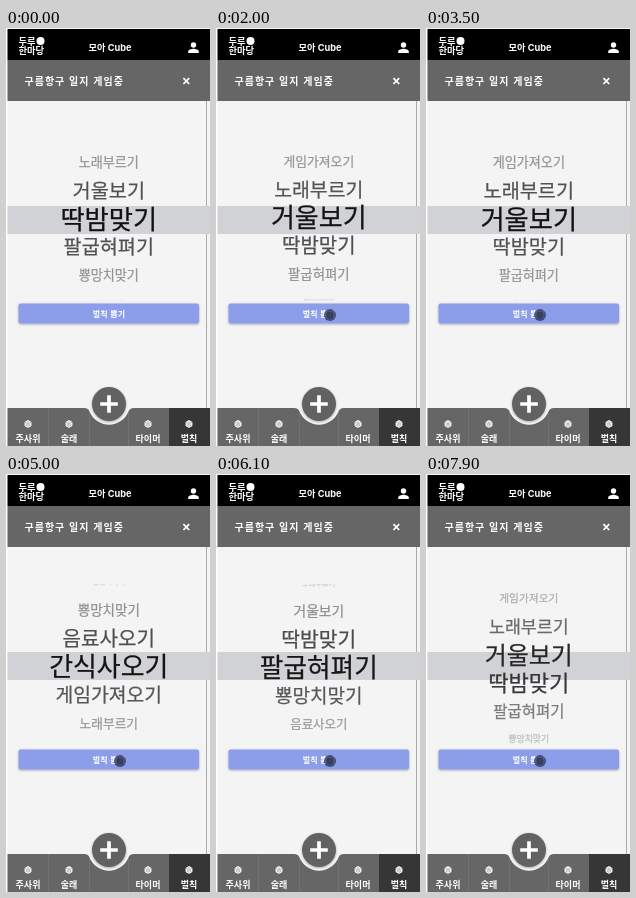
Write an HTML page that moves like this. It is 204 px wide and 418 px high and loops after 8 s.

```html
<!DOCTYPE html>
<html lang="ko">
<head>
<meta charset="utf-8">
<title>벌칙 뽑기</title>
<style>
  html, body { margin: 0; width: 100%; height: 100%; overflow: hidden; background: #fff; }
  svg { display: block; width: 100%; height: 100%; }
  text { font-family: "Noto Sans CJK KR", "Noto Sans CJK", "Noto Sans CJK JP", sans-serif; fill: #fff; }
  .bold { font-weight: 700; }
  .mid { text-anchor: middle; }
  #title { font-family: Inter, "Noto Sans CJK KR", sans-serif; }
  #wheel text { fill: #111; stroke: #111; stroke-width: .25; text-anchor: middle; }
</style>
</head>
<body>
<svg viewBox="0 0 204 418">
  <defs>
    <clipPath id="window"><rect y="110" width="204" height="162.5"/></clipPath>
    <filter id="shadow" x="-20%" y="-20%" width="140%" height="160%">
      <feDropShadow dx="0" dy=".8" stdDeviation=".9" flood-opacity=".35"/>
    </filter>
    <g id="die">
      <path d="M0-3.9 3.4-2V2L0 3.900-3.400 2V-2Z" fill="#fff"/>
      <path d="M-3.200-1.800 0 0 3.200-1.800M0 0V3.700" fill="none" stroke="#666" stroke-width=".5"/>
      <g fill="#555">
        <circle cy="-2" r=".6"/><circle cx="-1.700" cy="1" r=".6"/><circle cx="1.700" cy="1" r=".6"/>
      </g>
    </g>
  </defs>

  <rect x="1.5" width="202.5" height="418" fill="#f4f4f4"/>
  <path d="M200.5 73V382" stroke="#aaa"/>

  <!-- header -->
  <rect x="1.5" y="1" width="202.5" height="31" fill="#000"/>
  <g class="bold">
    <text x="12.5" y="16.6" font-size="9.3">두루</text>
    <text x="12.5" y="25.6" font-size="9.3">한마당</text>
    <text id="title" class="mid" x="104" y="23.3" font-size="9.2">모아 Cube</text>
  </g>
  <circle cx="34.5" cy="13" r="4" fill="#fff"/>
  <g fill="#fff">
    <circle cx="187.5" cy="17" r="2.7"/>
    <path d="M182.2 25v-1.4c0-1.9 3.5-2.800 5.300-2.800s5.300.9 5.300 2.800V25Z"/>
  </g>
  <rect x="1.5" y="32" width="202.5" height="41" fill="#666"/>
  <text class="bold" x="18.5" y="56.5" font-size="10" letter-spacing="1">구름항구 일지 게임중</text>
  <path d="m177.4 50.2 5.800 5.800m0-5.800-5.800 5.800" stroke="#fff" stroke-width="1.7"/>

  <!-- picker -->
  <rect x="1.5" y="178" width="202.5" height="28" fill="#d1d2d6"/>
  <g id="wheel" clip-path="url(#window)"></g>

  <!-- button -->
  <rect x="12.5" y="275.5" width="180.5" height="20" rx="2" fill="#8c9eea" filter="url(#shadow)"/>
  <text class="bold mid" x="103" y="288.5" font-size="8" letter-spacing=".2">벌칙 뽑기</text>
  <g id="pointer">
    <circle r="6" fill="#30385c" opacity=".8"/>
    <circle r="3.500" fill="#262c48" opacity=".5"/>
  </g>

  <!-- bottom bar -->
  <path d="M1.5 380H78Q82.5 380 83.5 383.5A21 21 0 0 0 122.5 383.5Q123.5 380 128 380H204V418H1.5Z" fill="#666"/>
  <path d="M163 380H204V418H163Z" fill="#363636"/>
  <path d="M42.5 380V418M83.5 384V418M122.5 384V418" stroke="#777" stroke-width=".7"/>
  <circle cx="103" cy="376" r="17" fill="#626262" filter="url(#shadow)"/>
  <path d="M103 367.200V384.800M94.200 376H111.800" stroke="#fff" stroke-width="3.7"/>
  <g id="tabs"></g>
</svg>
<script>
const LOOP = 8000, STEP = 100;
const PENALTIES = ["노래부르기", "거울보기", "딱밤맞기", "팔굽혀펴기",
                   "뿅망치맞기", "음료사오기", "간식사오기", "게임가져오기"];
const TABS = [["주사위", 22], ["술래", 63], ["타이머", 142], ["벌칙", 183]];

// [ms, wheel position]: spins accelerate briefly, then coast to a stop
const SPINS = [
  [0, 18], [1150, 18], [1400, 17], [1600, 14.5], [2000, 9.04], [2300, 5.85],
  [2700, 2.99], [3000, 1.8], [3500, 1],
  [4550, 1], [4800, 0.1], [5000, -2.06], [5400, -7.4], [5700, -10.5],
  [6100, -13.1], [6400, -13.65], [6900, -14],
  [7650, -14], [7900, -14.64], [8000, -15.4]
];

const setAttrs = (node, attrs) => {
  for (const key in attrs) node.setAttribute(key, attrs[key]);
};
const svgNode = (parent, tag, attrs, text = "") => {
  const node = document.createElementNS(parent.namespaceURI, tag);
  setAttrs(node, attrs);
  node.textContent = text;
  return parent.appendChild(node);
};
const clamp01 = v => Math.max(0, Math.min(1, v));

const slope = i => {
  const [a, b] = [SPINS[i], SPINS[i + 1]];
  return a && b ? (b[1] - a[1]) / (b[0] - a[0]) : 0;
};
// Harmonic mean keeps the curve monotone and flat at rests
const tangent = i => {
  const a = slope(i - 1), b = slope(i);
  return a * b > 0 ? 2 * a * b / (a + b) : 0;
};
function wheelPosition(ms) {
  const i = SPINS.findIndex((_, n) => n === SPINS.length - 2 || ms < SPINS[n + 1][0]);
  const [t0, p0] = SPINS[i], [t1, p1] = SPINS[i + 1];
  const span = t1 - t0, u = (ms - t0) / span, v = 1 - u;
  return p0 * (1 + 2 * u) * v * v + p1 * u * u * (3 - 2 * u)
    + span * u * v * (tangent(i) * v - tangent(i + 1) * u);
}

const wheel = document.getElementById("wheel");
const pointer = document.getElementById("pointer");
const tabs = document.getElementById("tabs");
const rows = Array.from({ length: 7 }, () => svgNode(wheel, "text", { x: 102.8 }));

for (const [label, x] of TABS) {
  svgNode(tabs, "use", { href: "#die", x, y: 396 });
  svgNode(tabs, "text", { x, y: 413.6, class: "mid bold", "font-size": 9 }, label);
}

function draw(ms) {
  const position = wheelPosition(ms);
  rows.forEach((row, n) => {
    const index = Math.round(position) + n - 3;
    const offset = index - position, distance = Math.abs(offset);
    const size = Math.max(0.1, 26.3 - 6.6 * distance);
    const count = PENALTIES.length;
    row.textContent = PENALTIES[(index % count + count) % count];
    setAttrs(row, {
      y: 190.6 + 28.2 * offset + 0.38 * size,
      "font-size": size,
      opacity: clamp01(1 - 0.29 * distance)
    });
  });

  const arrival = clamp01((ms - 500) / 300);
  setAttrs(pointer, {
    transform: `translate(${114 - 11 * (1 - arrival) ** 2} 287)`,
    opacity: arrival
  });
}

function tick() {
  const ms = performance.now() % LOOP;
  draw(Math.floor(ms / STEP) * STEP);
  requestAnimationFrame(tick);
}
tick();
</script>
</body>
</html>
```
